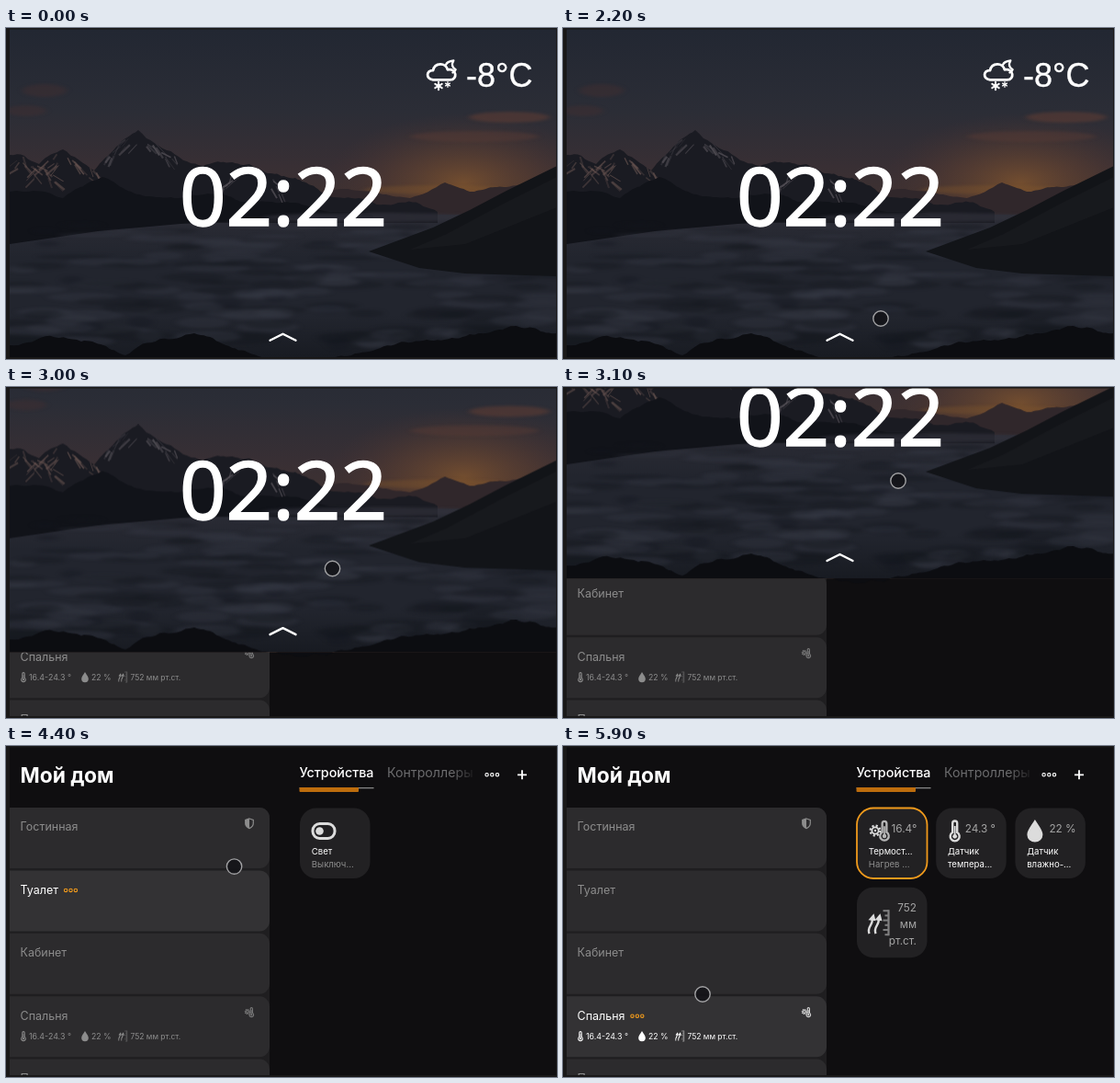
These frames come from a looping animation (600 px wide and 360 px high, 6000 ms). An HTML page:

```html
<!DOCTYPE html>
<html lang="ru">
<head>
<meta charset="utf-8">
<title>Мой дом</title>
<style>
html, body { margin: 0; width: 100%; height: 100%; overflow: hidden; background: #0f0e10; }
svg { display: block; width: 100vw; height: 100vh; }
text { font-family: Inter, "Noto Sans", sans-serif; white-space: pre; }
</style>
</head>
<body>
<svg id="stage" viewBox="0 0 600 360" xmlns="http://www.w3.org/2000/svg"></svg>
<script>
const LOOP = 6000, STEP = 100;
const BG = '#0f0e10', ORANGE = '#f09a1c', GREY = '#8d8d8d';
const ROWS = ['Гостинная', 'Туалет', 'Кабинет', 'Спальня', 'Прихожая'];
const PITCH = 68.4, CARD_X = 319.5, CARD_Y = 67, CARD_PITCH = 86.2;

// Markup helpers
const at = (x, y, body, s = 1, extra = '') =>
  `<g transform="translate(${x} ${y}) scale(${s})" ${extra}>${body}</g>`;
const label = (x, y, size, fill, str, extra = '') =>
  `<text x="${x}" y="${y}" font-size="${size}" fill="${fill}" ${extra}>${str}</text>`;
const line = (d, width, extra = '') =>
  `<path d="${d}" fill="none" stroke="currentColor" stroke-width="${width}" ${extra}/>`;
const shape = (d, fill, extra = '') => `<path d="${d}" fill="${fill}" ${extra}/>`;
const blob = (x, y, rx, ry, fill, op) =>
  `<ellipse cx="${x}" cy="${y}" rx="${rx}" ry="${ry}" fill="${fill}" opacity="${op}"/>`;
const times = (n, f) => Array.from({ length: n }, (_, i) => f(i)).join('');
const threeDots = (x, y, color, gap) => times(3, i =>
  `<circle cx="${x + i * gap}" cy="${y}" r="1.7" fill="none" stroke="${color}" stroke-width="1.1"/>`);

// Icons are drawn around their own centre
const thermo = line('M-2.5 3V-7a2.5 2.5 0 0 1 5 0V3a5 5 0 1 1-5 0z', 2.4) +
  line('M0-4V7', 1.8) + '<circle cy="7.3" r="2.4" fill="currentColor"/>';
const drop = shape('M0-12C5-4 8.5 0 8.5 4.5a8.5 8 0 0 1-17 0C-8.5 0-5-4 0-12z', 'currentColor');
const gear = line('M-3.6 0a3.6 3.6 0 1 1 7.2 0 3.6 3.6 0 1 1-7.2 0z', 1.8) +
  '<circle r="5.4" fill="none" stroke="currentColor" stroke-width="2.2" stroke-dasharray="2.12"/>' +
  '<circle r="1.2" fill="currentColor"/>';
const gust = line('M-1 10C-4 2 4 0 2-6', 2.4) + shape('M-2-5 4-12 6-4z', 'currentColor');
const ruler = line('M10-14V14', 2.2) + times(6, i => line(`M10 ${-13 + i * 5.2}h${i % 2 ? -4 : -6}`, 2));
const pressure = at(-10, 2, gust) + at(-3, 2, gust) + `<g opacity=".5">${ruler}</g>`;
const heater = at(-5, 0, gear) + at(5, 0, thermo, 1, 'opacity=".8"');
const shield = line('M0-5 4.3-3.6V0C4.3 2.8 2 4.7 0 5.6-2 4.7-4.3 2.8-4.3 0V-3.6z', 1.2) +
  shape('M0-5V5.6C-2 4.7-4.3 2.8-4.3 0V-3.6z', 'currentColor');
const toggle = '<rect x="-12" y="-8" width="24" height="16" rx="7.5" fill="none" stroke="currentColor" stroke-width="3"/>' +
  '<circle cx="-4.5" r="4.3" fill="currentColor"/>';
const flake = times(3, i => line('M0-4.3V4.3', 2, `transform="rotate(${i * 60})"`));

// Landscape
function random(seed) {
  return () => (seed = (seed * 16807) % 2147483647) / 2147483647;
}

// Jagged skyline through a few points, closed along the base
function ridge(points, base, rough, seed) {
  const rnd = random(seed);
  const split = (a, b) => {
    const len = b[0] - a[0];
    if (len < 5) return [b];
    const mid = [(a[0] + b[0]) / 2, (a[1] + b[1]) / 2 + (rnd() - .5) * rough * len];
    return [...split(a, mid), ...split(mid, b)];
  };
  const top = points.slice(1).reduce((out, p, i) => out.concat(split(points[i], p)), [points[0]]);
  const path = top.map(p => p.map(v => v.toFixed(1)).join(' ')).join('L');
  return `M${path}L${top[top.length - 1][0]} ${base}L${points[0][0]} ${base}z`;
}

function snow() {
  const rnd = random(31);
  return [[18, 139], [62, 133], [144, 112], [262, 147]].map(([px, py]) => times(26, () => {
    const dx = (rnd() - .45) * 76, y = py + Math.abs(dx) * .6 + rnd() * 14;
    const run = Math.sign(dx) * (3 + rnd() * 9);
    return `<path d="M${px + dx} ${y}l${run} ${5 + rnd() * 7}" stroke="${px < 100 ? '#65524f' : '#565259'}"
      stroke-width="${.6 + rnd() * 1.8}" opacity="${.3 + rnd() * .5}"/>`;
  })).join('');
}

function mist() {
  const rnd = random(77);
  return times(170, i => {
    const depth = rnd();
    return blob(rnd() * 600, 214 + depth * 130, 12 + rnd() * 32, 1.2 + depth * 4 + rnd() * 2,
      i % 2 ? '#383b46' : '#13161d', .33);
  });
}

const farRange = ridge([[335, 178], [410, 181], [440, 185], [478, 168], [505, 178], [545, 173], [600, 168]], 212, .12, 5);
const peaks = ridge([[4, 138], [36, 148], [62, 132], [96, 155], [144, 111], [215, 150], [265, 148], [345, 180], [470, 200]], 212, .25, 9);
const frontRange = ridge([[4, 178], [62, 185], [105, 162], [155, 183], [220, 180], [300, 190], [400, 204]], 206, .15, 12);
const rocks = ridge([[4, 345], [82, 341], [130, 356], [205, 332], [260, 351], [380, 354], [505, 333], [600, 332]], 359, .2, 21);

const landscape = `<rect x="4" width="596" height="359" fill="url(#sky)"/>
  <rect x="300" y="60" width="300" height="150" fill="url(#glow)"/>
  <g filter="url(#soft)">
    ${blob(42, 68, 24, 7, '#5a302f', .25)}${blob(22, 90, 22, 6, '#56302f', .25)}
    ${blob(548, 97, 44, 6, '#6d4034', .45)}${blob(510, 118, 70, 6, '#5c3d36', .4)}
    ${blob(470, 176, 80, 5, '#8a5c2c', .3)}
  </g>
  ${shape(farRange, '#30272b')}
  <rect x="4" y="203" width="596" height="156" fill="url(#mist)"/>
  ${shape(peaks, '#1a1b22')}<g clip-path="url(#peaks)">${snow()}</g>
  ${shape(frontRange, '#111319')}
  ${shape('M4 200H400L300 208 190 213 100 221 4 235z', '#111319')}
  <g filter="url(#soft)">${blob(400, 206, 120, 5, '#34353e', .6)}${mist()}</g>
  ${shape('M600 150 545 177 505 198 465 217 395 243 450 261 500 267 600 270z', '#121418')}
  ${shape('M600 162 540 192 480 224 440 241 500 235 600 195z', '#1b1c20', 'opacity=".7"')}
  ${shape(rocks, '#0c0d11')}`;

const cloud = line('M464 58.5C455 57 456 47 464 47.5 466 38 479 38 481 46.5 492 45 493 58 484 58.5z', 3) +
  line('M479 41C480 38 483 36.5 488 36 485 41 487 44.5 490.5 46.5 489.5 48.5 488.5 49.5 487 50', 2.5);
const weather = `<g color="#fff" stroke-linecap="round" stroke-linejoin="round">
  ${at(33.5, 2, cloud, .93)}${at(471, 63, flake)}${at(481, 61.5, flake, .65)}</g>`;

const lockScreen = `<g id="lock">${landscape}${weather}
  ${label(573.5, 64.3, 36, '#fff', '-8°C', 'text-anchor="end" stroke="#fff" stroke-width=".4" style="font-family:\'Liberation Sans\',sans-serif"')}
  ${label(302, 214.5, 88.5, '#fff', '02:22', 'text-anchor="middle" stroke="#fff" stroke-width="1.5" style="font-family:\'Noto Sans\',sans-serif"')}
  <path d="M287.5 339.7 301.5 332.7 315.5 339.7" fill="none" stroke="#fff" stroke-width="2.4" stroke-linecap="round" stroke-linejoin="round"/></g>`;

// Room list and device cards
function row(name, i) {
  const y = 67 + PITCH * i, mid = 88 + PITCH * i;
  let out = `<path id="row${i}" d="M4 ${y}H276a11 11 0 0 1 11 11v44a11 11 0 0 1-11 11H4z"/>` +
    label(15.5, mid + 4.3, 12.5, 'currentColor', name, `id="name${i}"`);
  if (i === 0) out += at(265, 84, shield);
  if (i === 3) {
    out += at(265, 289, heater, .46) + at(19, 315, thermo, .46) + at(86, 315.5, drop, .45) +
      at(127.5, 315.5, pressure, .42) + label(25, 319, 8.9, 'currentColor', '16.4-24.3 °') +
      label(93, 319, 8.7, 'currentColor', '22 %') + label(135.5, 319, 8.5, 'currentColor', '752 мм рт.ст.');
  }
  return `<g id="item${i}">${out}<g id="dots${i}">${threeDots(0, mid + .5, ORANGE, 5.4)}</g></g>`;
}

function card(col, line, icon, title = '', sub = '', subFill = '#fff', edge = 'none') {
  return at(CARD_X + col * CARD_PITCH, CARD_Y + line * CARD_PITCH,
    `<rect x=".5" y=".5" width="76.5" height="76.5" rx="18" fill="#222123" stroke="${edge}" stroke-width="1.8"/>` +
    icon + label(13.3, 51, 9.6, '#fff', title) + label(13.3, 64.5, 9.6, subFill, sub), 1, 'color="#dcdcdc"');
}
const value = (x, y, str, extra) => label(x, y, 11.8, '#a5a5a5', str, extra);
const note = (y, str) => label(CARD_X, y, 16.2, '#6d6d70', str, 'font-weight="600"');

const rooms = [
  card(0, 0, at(26.5, 25.5, toggle), 'Свет', 'Выключ…', GREY),
  note(203, 'В этой комнате нет') + note(223.5, 'устройств'),
  card(0, 0, at(20.5, 25, gear) + at(30.5, 24, thermo, .95, 'opacity=".8"') + value(38, 27, '16.4°'),
    'Термост…', 'Нагрев …', GREY, ORANGE) +
    card(1, 0, at(21, 24, thermo) + value(32, 27, '24.3 °'), 'Датчик', 'темпера…') +
    card(2, 0, at(22, 25, drop) + value(37.5, 27, '22 %'), 'Датчик', 'влажно-…') +
    card(0, 1, at(25, 39, pressure) + ['752', 'мм', 'рт.ст.'].map((s, i) =>
      value(65.5, 27 + i * 18, s, 'text-anchor="end"')).join(''))
];

const panel = `<rect width="600" height="360" fill="${BG}"/>
  ${label(15.5, 40, 22.8, '#fff', 'Мой дом', 'font-weight="700"')}
  <path d="M4 67H276a11 11 0 0 1 11 11V360H4z" fill="#1f1e20"/>
  ${ROWS.map(row).join('')}
  ${label(CARD_X, 34, 14.3, '#fff', 'Устройства', 'font-weight="500"')}
  ${label(415, 34, 14.2, '#6c6c6e', 'Контроллеры')}
  <rect x="486" y="18" width="30" height="24" fill="url(#fade)"/>
  <rect x="${CARD_X}" y="45" width="81" height="1.3" fill="#858585"/>
  <rect x="${CARD_X}" y="45" width="64.5" height="5" rx="1" fill="#bd6d0d"/>
  ${threeDots(523.6, 31.3, '#fff', 5.7)}
  <path d="M557 31.3h10M562 26.3v10" stroke="#fff" stroke-width="1.8"/>
  ${rooms.map((body, i) => `<g id="room${i}">${body}</g>`).join('')}`;

const moveArrow = times(4, i =>
  `<path d="M-2.4-2.6 0-5.8 2.4-2.6H.8V0H-.8V-2.6z" transform="rotate(${i * 90})"/>`);
const pointer = `<g id="pointer">
  <g id="arrow" fill="#0c0d10" stroke="#858585" stroke-width=".6">${moveArrow}</g>
  <circle id="ring" r="8.2" fill="#131317" fill-opacity=".85" stroke="#a2a2a4" stroke-width="1.4"/></g>`;

const stops = list => list.map(([o, c, a = 1]) =>
  `<stop offset="${o}" stop-color="${c}" stop-opacity="${a}"/>`).join('');
const defs = `<defs>
  <linearGradient id="sky" x2="0" y2="1">${stops([[0, '#222732'], [.25, '#2b2d36'], [.42, '#382f34'], [.56, '#40322f']])}</linearGradient>
  <radialGradient id="glow" cx=".66" cy=".72" r=".5">${stops([[0, '#8a5a2e', .7], [.5, '#6b452f', .4], [1, '#503430', 0]])}</radialGradient>
  <linearGradient id="mist" x2="0" y2="1">${stops([[0, '#2b2c35'], [.3, '#22252e'], [.7, '#22252e'], [1, '#181b22']])}</linearGradient>
  <linearGradient id="fade">${stops([[0, BG, 0], [.8, BG, .9], [1, BG]])}</linearGradient>
  <clipPath id="peaks"><path d="${peaks}"/></clipPath>
  <filter id="soft" x="-10%" y="-10%" width="120%" height="120%" color-interpolation-filters="sRGB">
    <feGaussianBlur stdDeviation="3 1.6"/></filter>
</defs>`;

const frame = '<path d="M0 0H600V1.5H4V358H600V360H0z" fill="#191818"/><path d="M599 0h1v360h-1z" fill="#191818"/>';

const el = id => document.getElementById(id);
el('stage').innerHTML = defs + panel + lockScreen + frame + pointer;
ROWS.forEach((_, i) => {
  const x = 15.5 + el('name' + i).getComputedTextLength() + 8;
  el('dots' + i).setAttribute('transform', `translate(${x} 0)`);
});

// Motion
const linear = u => u, easeIn = u => u * u, easeOut = u => 1 - (1 - u) ** 2;
const smooth = u => u * u * (3 - 2 * u);
const span = (t, from, to) => Math.min(1, Math.max(0, (t - from) / (to - from)));

// Pointer moves: start, end, target, easing
const ENTRY = [269, 156];
const MOVES = [
  [500, 700, 443, 350, linear], [700, 800, 407, 325, linear], [900, 1300, 353, 284, easeOut],
  [2000, 2200, 346, 316, linear],
  [2700, 2900, 346, 293, easeIn], [2900, 3100, 365, 102, linear], [3100, 3400, 382, 23, easeOut],
  [3800, 4100, 373, 37, linear], [4200, 4500, 205, 164, smooth], [4600, 4900, 164, 239, smooth],
  [5200, 5400, 153, 303, linear], [5400, 5600, 152, 270, easeOut]
];
const pointerAt = t => MOVES.reduce(([x, y], [from, to, tx, ty, ease]) => {
  const k = ease(span(t, from, to));
  return [x + (tx - x) * k, y + (ty - y) * k];
}, ENTRY);

const PICKS = [[0, 1], [5100, 2], [5800, 3]]; // time, selected row

const show = (id, on) => el(id).setAttribute('visibility', on ? 'visible' : 'hidden');

function draw(t) {
  const shift = 360 * smooth(span(t, 2770, 3400) ** 1.25);
  el('lock').setAttribute('transform', `translate(0 ${-shift})`);
  show('lock', shift < 360);

  const pick = PICKS.filter(p => p[0] <= t).length - 1;
  const [since, active] = PICKS[pick];
  const before = pick ? PICKS[pick - 1][1] : active;
  const k = span(t, since, since + STEP);
  ROWS.forEach((_, i) => {
    const level = i === active ? (active === before ? 1 : .6 + .4 * k) : i === before ? 1 - k : 0;
    const c = Math.round(140 + 115 * level);
    el('item' + i).setAttribute('color', `rgb(${c},${c},${c})`);
    el('row' + i).setAttribute('fill', i === active ? '#333234' : '#2c2b2d');
    show('dots' + i, i === active);
  });
  rooms.forEach((_, i) => show('room' + i, i === pick));

  el('pointer').setAttribute('transform', `translate(${pointerAt(t)})`);
  show('arrow', t >= 500 && t < 1500);
  show('ring', t >= 1700);
  el('ring').setAttribute('opacity', t >= 3400 && t < 3900 ? .4 : 1);
}

const start = performance.now();
function tick() {
  const t = (performance.now() - start) % LOOP;
  draw(Math.floor(t / STEP) * STEP);
  requestAnimationFrame(tick);
}
tick();
</script>
</body>
</html>
```
